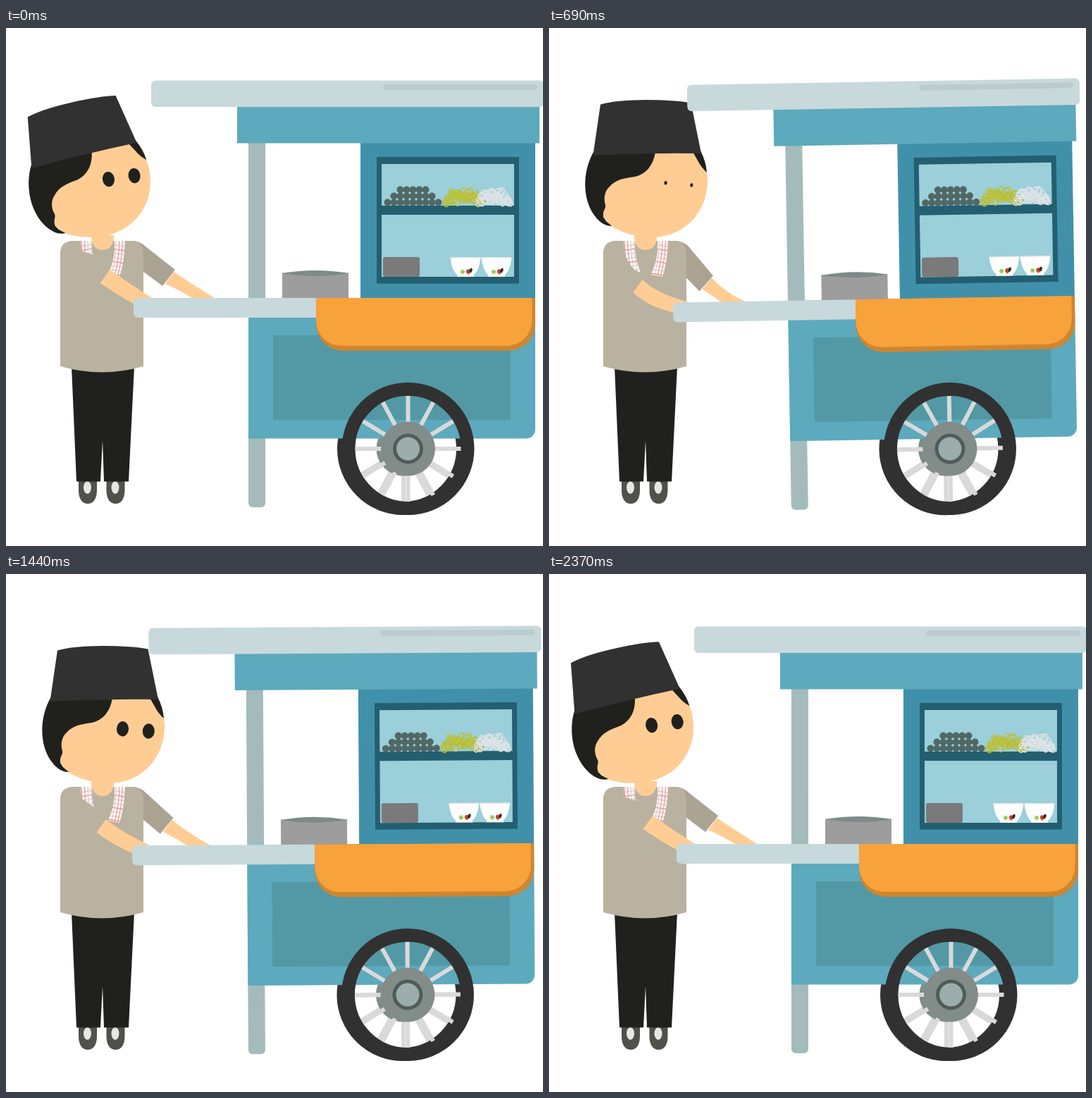
These frames come from a looping animation (762x735 px, 2400 ms). An HTML page with a canvas:

```html
<!DOCTYPE html>
<html lang="en">
<head>
<meta charset="utf-8">
<title>Food cart</title>
<style>
  html, body { margin: 0; width: 100%; height: 100%; overflow: hidden; background: #fff; }
  canvas { display: block; }
</style>
</head>
<body>
<canvas id="stage" width="762" height="735"></canvas>
<script>
const ctx = document.getElementById('stage').getContext('2d');
const LOOP = 2400, STEP = 30;
const SKIN = '#ffcd94', BLACK = '#20211c', TEAL = '#5da9bd', PALE = '#c8d9db';
const SHIRT = '#b9b2a0', SLEEVE = '#aba392';

const ease = p => (1 - Math.cos(Math.PI * p)) / 2;
const mix = (a, b, k) => a + (b - a) * k;
const mixAll = (a, b, k) => a.map((v, i) => mix(v, b[i], k));

function fillPath(color, d) {
  ctx.fillStyle = color;
  ctx.fill(new Path2D(d));
}
function box(color, x1, y1, x2, y2, radius = 0) {
  ctx.fillStyle = color;
  ctx.beginPath();
  ctx.roundRect(x1, y1, x2 - x1, y2 - y1, radius);
  ctx.fill();
}
function oval(color, x, y, rx, ry = rx, turn = 0) {
  ctx.fillStyle = color;
  ctx.beginPath();
  ctx.ellipse(x, y, rx, ry, turn, 0, Math.PI * 2);
  ctx.fill();
}
function rotated(angle, x, y, draw) {
  ctx.save();
  ctx.translate(x, y);
  ctx.rotate(angle);
  ctx.translate(-x, -y);
  draw();
  ctx.restore();
}
function seeded(seed) {
  return () => (seed = (seed * 16807) % 2147483647) / 2147483647;
}

function drawLegs() {
  for (const x of [116, 155.5]) {
    fillPath('#50514a', `M${x - 13} 643h26v13c0 12-5 19-13 19s-13-7-13-19z`);
    oval('#e6e6e6', x - 0.5, 652, 5.5, 9);
  }
  fillPath(BLACK, 'M93 480H182L174 643.5H139L137 585L134 643.5H100Z');
}

function drawBackArm(k) {
  const [ax, ay, bx, by] = mixAll([240, 343, 222, 366], [232.5, 352, 213, 374], k);
  const [cx, cy, ex, ey, dx, dy, fx, fy] =
    mixAll([267, 365, 300, 386, 249, 373, 270, 387], [251, 378, 284, 391, 231, 381, 249, 393], k);
  fillPath(SKIN, `M${ax - 2} ${ay + 3}Q${cx} ${cy} ${ex} ${ey}L${fx} ${fy}Q${dx} ${dy} ${bx + 4} ${by - 3}Z`);
  fillPath(SLEEVE, `M178 302Q190 302 198 310L${ax} ${ay}L${bx} ${by}L190 ${mix(342, 350, k)}Z`);
}

function drawTowel(d, lean) {
  ctx.save();
  const path = new Path2D(d);
  ctx.clip(path);
  ctx.fillStyle = '#fbf7f6';
  ctx.fill(path);
  ctx.lineWidth = 1;
  for (let i = 0; i < 9; i++) {
    const y = 305 + i * 6, x = 98 + i * 9;
    ctx.strokeStyle = i % 3 === 1 ? '#e96f74' : '#d3c3c1';
    ctx.beginPath();
    ctx.moveTo(100, y - lean * 28);
    ctx.lineTo(175, y + lean * 28);
    ctx.stroke();
    ctx.strokeStyle = i % 2 ? '#e9898b' : '#d9c8c5';
    for (const shift of [0, 4.5]) {
      ctx.beginPath();
      ctx.moveTo(x + shift, 300);
      ctx.quadraticCurveTo(x + shift, 325, x + shift - lean * 35, 355);
      ctx.stroke();
    }
  }
  ctx.restore();
}

function drawTorso() {
  fillPath(SHIRT, 'M77 318Q78 303 94 302H181Q195 304 195 322V480Q136 497 77 480Z');
  drawTowel('M106 302H122Q121 327 131 348Q106 339 106 302Z', -0.2);
  drawTowel('M154 302H169Q168 334 161 353L144 350Q155 330 154 302Z', 0.22);
  fillPath(SKIN, 'M121 294H153V299Q150 315 137 315Q124 315 121 299Z');
}

function drawFrontArm(k) {
  const [ax, ay, bx, by, sx, sy] = mixAll([147, 343, 133.5, 362, 124, 322], [131.5, 358, 118.5, 376, 117, 341], k);
  const [cx, cy, ex, ey, dx, dy, fx, fy] =
    mixAll([177, 364, 210, 385, 160, 380, 189, 396], [155, 380, 205, 391, 143, 399, 182, 405], k);
  fillPath(SHIRT, `M95 316L106 ${mix(316, 320, k)}L${sx} ${sy}L${ax} ${ay}L${bx} ${by}L95 350Z`);
  fillPath(SKIN, `M${ax} ${ay}Q${cx} ${cy} ${ex} ${ey}L${fx} ${fy}Q${dx} ${dy} ${bx} ${by}Z`);
}

function drawHead(eyeScale) {
  fillPath(SKIN, 'M80 170H208C220 190 225 203 225 216C225 260 194 296 147 297C122 296 104 291 88 281L72 262L66 200Z');
  fillPath(BLACK, 'M63 176H151C148 195 138 207 122 211C106 213 95 215 86 225C79 231 77 242 80 251C81 257 76 258 77 268L81 274L89 281C78 281 70 274 63 264C48 241 47 205 63 176Z');
  fillPath(BLACK, 'M203 174H215Q223 190 224 205Q216 198 211 188Z');
  fillPath('#313131', 'M73 108.5Q95 102 137 102Q180 102 201.5 106.5L216 178Q140 177 62.5 180.5Z');
  oval(BLACK, 165.5, 219.8, 8.5 * eyeScale, 10.7 * eyeScale, 0.05);
  oval(BLACK, 202.3, 223, 8.5 * eyeScale, 10.7 * eyeScale, 0.05);
}

function drawWheel(x, y) {
  ctx.strokeStyle = '#313131';
  ctx.lineWidth = 19;
  ctx.beginPath();
  ctx.arc(x, y, 84.5, 0, Math.PI * 2);
  ctx.stroke();
  ctx.strokeStyle = '#d9d9d9';
  ctx.lineWidth = 6;
  for (let i = 0; i < 12; i++) {
    const a = i * Math.PI / 6 + 0.03 * Math.sin(i * Math.PI / 3);
    ctx.beginPath();
    ctx.moveTo(x, y);
    ctx.lineTo(x + 75 * Math.cos(a), y + 75 * Math.sin(a));
    ctx.stroke();
  }
  oval('#828c89', x, y, 38.5);
  oval('#515b59', x, y, 21.5);
  oval('#9badad', x, y, 16.5);
}

function drawNoodles(color, x, halfWidth, seed) {
  const rand = seeded(seed);
  const count = 38;
  ctx.strokeStyle = color;
  ctx.lineWidth = 1.5;
  for (let i = 0; i < count; i++) {
    const u = 2 * (i + 0.5) / count - 1;
    const top = 19 * (1 - u ** 4);
    ctx.beginPath();
    ctx.ellipse(x + u * (halfWidth - 5), 248.5 - rand() * top, 5.5, 3.6, rand() * Math.PI, 0, Math.PI * 2);
    ctx.stroke();
  }
}

function drawBowl(x) {
  fillPath('#fdfdfd', `M${x - 21.5} 326H${x + 21.5}Q${x + 19} 345 ${x + 12} 350V353H${x - 12}V350Q${x - 19} 345 ${x - 21.5} 326Z`);
  box('#e4e6e5', x - 21.5, 325, x + 21.5, 326.5);
  ctx.strokeStyle = '#8cc63f';
  ctx.lineWidth = 1.6;
  for (let i = 0; i < 3; i++) {
    const dx = 3.4 * Math.cos(i * Math.PI / 3), dy = 3.4 * Math.sin(i * Math.PI / 3);
    ctx.beginPath();
    ctx.moveTo(x - 4 - dx, 346 - dy);
    ctx.lineTo(x - 4 + dx, 346 + dy);
    ctx.stroke();
  }
  oval('#c8402c', x + 4, 345.5, 3, 3.2);
  oval('#33302c', x + 7.5, 344, 2, 3.4, 0.3);
  oval('#e08a35', x + 4, 349, 1.6, 1);
}

function drawShelves() {
  box('#235f70', 526, 183, 728, 362.5);
  box('#9bcfd9', 533, 193, 721, 252);
  box('#9bcfd9', 533, 265, 721, 353);
  [9, 7, 5].forEach((count, row) => {
    for (let i = 0; i < count; i++) oval('#506866', 541.5 + row * 9 + i * 9, 247.5 - row * 9, 5);
  });
  drawNoodles('#bdbf33', 649, 31, 71);
  drawNoodles('#dfe2e5', 693, 27, 933);
  box('#7a7a7a', 535, 325, 587, 353, 3);
  drawBowl(652);
  drawBowl(696);
}

function drawCart() {
  drawWheel(564, 597);
  box('#a4bbbc', 344, 160, 368, 680, [0, 0, 6, 6]);
  box('#4190aa', 503, 160, 751, 385);
  box(TEAL, 328, 111, 757, 163.5);
  box(PALE, 206, 74.5, 763, 112, 6);
  box('#baccce', 535, 80, 754, 88, 4);
  drawShelves();
  box('#9d9d9d', 392, 347.5, 486, 384);
  fillPath('#7c8b88', 'M392 348Q439 340 486 348Q439 356 392 348Z');
  box(TEAL, 344, 383, 751, 582.5, [0, 0, 13, 0]);
  box('#5299a5', 379, 436, 716, 556);
  box(PALE, 181, 383, 442, 411, [6, 0, 0, 6]);
  box('#d0852f', 440, 383, 751, 458, [0, 0, 38, 38]);
  box('#f7a23b', 440, 383, 746.5, 451, [0, 0, 36, 36]);
  drawWheel(570.5, 597);
}

function draw(t) {
  const push = ease(t / 600);
  const headTilt = t < 600 ? 1 - ease(t / 600) : t < 1800 ? 0 : ease((t - 1800) / 600);
  const fromBlink = Math.min(1, Math.abs(t % 1200 - 705) / 335);
  const eyeScale = mix(0.25, 1, ease(fromBlink));

  ctx.fillStyle = '#fff';
  ctx.fillRect(0, 0, 762, 735);
  drawLegs();
  drawBackArm(push);
  drawTorso();
  drawFrontArm(push);
  rotated(-0.222 * headTilt, 132, 307, () => drawHead(eyeScale));
  rotated(-0.0176 * push, 575, 690, drawCart);
}

function tick() {
  const t = performance.now() % LOOP;
  draw(Math.floor(t / STEP) * STEP);
  requestAnimationFrame(tick);
}
tick();
</script>
</body>
</html>
```
